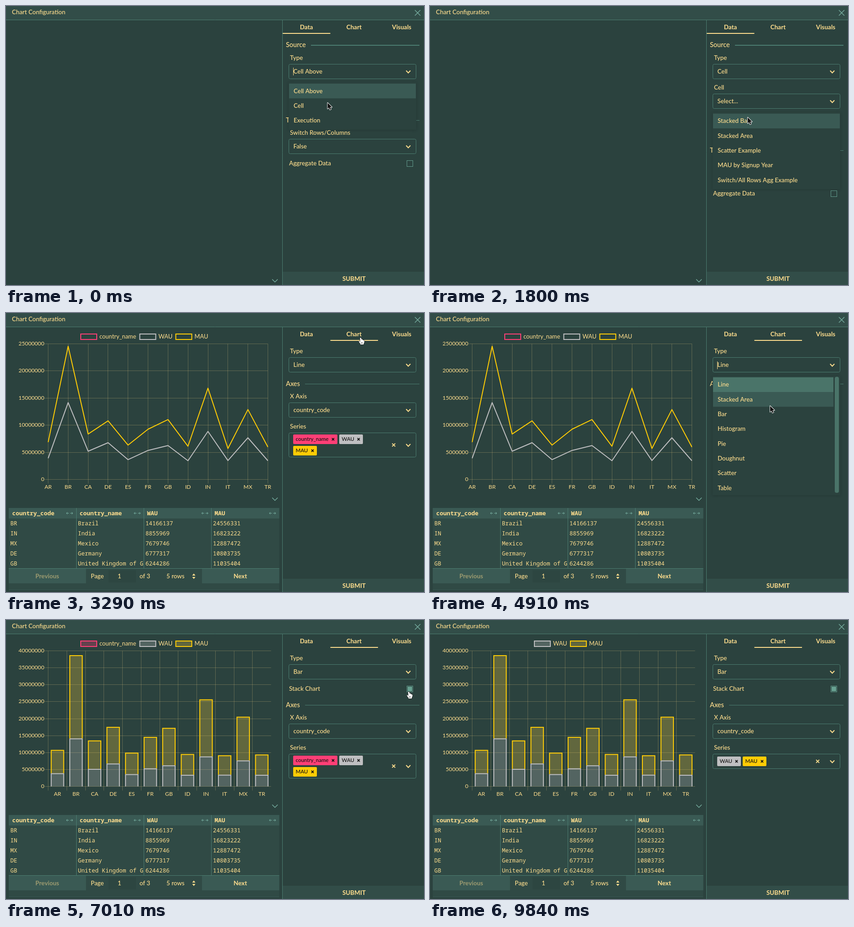
Recreate the animation shown at these times as an HTML page with a canvas. Size 917 px wide and 611 px high, loop 9.94 s.

```html
<!DOCTYPE html>
<html lang="en">
<head>
<meta charset="utf-8">
<title>Chart Configuration</title>
<style>
html, body { margin: 0; width: 100%; height: 100%; overflow: hidden; background: #2b423e; }
canvas { display: block; }
</style>
</head>
<body>
<canvas id="stage" width="917" height="611"></canvas>
<script>
const g = document.getElementById('stage').getContext('2d');
const LOOP = 9940;
const C = {
  bg: '#2b423e', bar: '#324d48', hover: '#3a5a54', selected: '#4a7469', line: '#4c7d71',
  icon: '#76ad9f', text: '#ffde8e', panel: '#304a45', grid: 'rgba(255,218,135,.26)'
};
const SANS = 'Lato, "Open Sans", sans-serif';
const MONO = '"Noto Sans Mono", "DejaVu Sans Mono", monospace';
const UI = '500 13.4px ' + SANS, BOLD = 'bold 13.5px ' + SANS, HEAD = '500 14.5px ' + SANS;
const LEGEND = '12.9px ' + SANS, TICK = '12.2px ' + SANS, TAG = '500 11.5px ' + SANS;

const SERIES = [
  { name: 'country_name', rgb: '255,63,118', fill: 'rgba(255,63,118,.27)', width: 97 },
  { name: 'WAU', rgb: '191,191,193', fill: 'rgba(191,191,193,.27)', width: 52 },
  { name: 'MAU', rgb: '255,204,5', fill: 'rgba(250,208,62,.26)', width: 52 }
];
const CODES = 'AR BR CA DE ES FR GB ID IN IT MX TR'.split(' ');
const WAU = [3.9, 14.166, 5.2, 6.777, 3.65, 5.35, 6.244, 3.45, 8.856, 3.48, 7.68, 3.45];
const MAU = [6.87, 24.556, 8.37, 10.804, 6.33, 9.26, 11.035, 6.12, 16.823, 5.7, 12.887, 5.97];
const ROWS = [
  ['BR', 'Brazil', '14166137', '24556331'],
  ['IN', 'India', '8855969', '16823222'],
  ['MX', 'Mexico', '7679746', '12887472'],
  ['DE', 'Germany', '6777317', '10803735'],
  ['GB', 'United Kingdom of G', '6244286', '11035404']
];
const TYPES = ['Cell Above', 'Cell', 'Execution'];
const CELLS = ['Stacked Bar', 'Stacked Area', 'Scatter Example', 'MAU by Signup Year', 'Switch/All Rows Agg Example'];
const CHARTS = ['Line', 'Stacked Area', 'Bar', 'Histogram', 'Pie', 'Doughnut', 'Scatter', 'Table'];

function rect(x, y, w, h, color) {
  g.fillStyle = color;
  g.fillRect(x, y, w, h);
}
function path(points, color, width = 1) {
  g.beginPath();
  for (let i = 0; i < points.length; i += 2) g.lineTo(points[i], points[i + 1]);
  g.strokeStyle = color;
  g.lineWidth = width;
  g.stroke();
}
function box(x, y, w, h, color, r = 3) {
  g.beginPath();
  g.roundRect(x, y, w, h, r);
  g.strokeStyle = color;
  g.lineWidth = 1;
  g.stroke();
}
// y is the vertical centre of the capitals
function text(s, x, y, font = UI, color = C.text, align = 'left') {
  g.font = font;
  g.fillStyle = color;
  g.textAlign = align;
  g.fillText(s, x, y + 4.7);
}
const chevron = (x, y, w, h, color, width) => path([x - w, y - h, x, y + h, x + w, y - h], color, width);
function cross(x, y, r, color, width) {
  path([x - r, y - r, x + r, y + r], color, width);
  path([x - r, y + r, x + r, y - r], color, width);
}

function section(title, y, lineX, width = 1) {
  text(title, 614, y, HEAD);
  path([lineX, y + .5, 907, y + .5], C.line, width);
}
function control(y, h = 32) {
  box(620.5, y + .5, 279, h, C.line);
  chevron(882.5, y + h / 2 + 1, 4.7, 2.5, C.text, 2);
}
function select(label, value, y) {
  text(label, 623, y - 13.5);
  control(y);
  text(value, 630.5, y + 16);
}
const caret = y => rect(630, y, 1, 17, C.text);
function checkbox(label, y, checked) {
  text(label, 621, y);
  if (checked) rect(881, y - 4, 10, 10, '#68a292');
  g.strokeStyle = '#619a8b';
  g.lineWidth = 1;
  g.strokeRect(879.5, y - 5.5, 13, 13);
}
function menu(items, top, focus, chosen, scroll) {
  const row = 32.3, h = items.length * row + (scroll ? 0 : 4), w = scroll ? 264 : 278;
  g.save();
  g.shadowColor = 'rgba(0,0,0,.16)';
  g.shadowBlur = 6;
  g.shadowOffsetY = 1;
  rect(620, top - 3, 280, h + 3, C.bg);
  g.restore();
  items.forEach((item, i) => {
    const y = top + i * row;
    if (i === focus) rect(621, y, w, row, C.hover);
    else if (i === chosen) rect(621, y, w, row, C.selected);
    text(item, 631, y + 16);
  });
  if (scroll) {
    g.fillStyle = C.selected;
    g.beginPath();
    g.roundRect(888, top - 1, 9, 254, 4);
    g.fill();
  }
}
const rowAt = (y, top) => Math.max(0, Math.floor((y - top) / 32.3));

function frame(tab, tableOpen) {
  rect(0, 0, 917, 611, C.bg);
  rect(0, 0, 917, 30, C.bar);
  path([0, 30.5, 917, 30.5], C.line);
  path([606.5, 30, 606.5, 611], C.line);
  text('Chart Configuration', 13, 13.5);
  cross(903, 15, 6, C.icon, 1.4);
  ['Data', 'Chart', 'Visuals'].forEach((s, i) => text(s, 659 + i * 104.5, 46.5, BOLD, C.text, 'center'));
  rect(607 + tab * 104.6, 59, 104.5, 2, C.text);
  rect(607, 582, 310, 29, C.bar);
  text('SUBMIT', 763.5, 597, BOLD, C.text, 'center');
  chevron(590, tableOpen ? 407.5 : 601.5, 6, 3, C.icon, 1.5);
}

function dataTab(t, mouse) {
  const open = t < 600, shift = open ? 0 : 65.5;
  section('Source', 85.5, 669, 2);
  select('Type', open ? 'Cell Above' : 'Cell', 127);
  if (!open) select('Cell', t < 2250 ? 'Select...' : 'Stacked Bar', 192);
  section('Transform', Math.round(250 + shift), 691);
  select('Switch Rows/Columns', 'False', Math.round(290.5 + shift));
  checkbox('Aggregate Data', Math.round(344 + shift), false);
  if (open) {
    menu(TYPES, 170, t < 150 ? 0 : 1, 0);
    if (t < 150) caret(135);
  } else if (t >= 1350 && t < 2250) {
    menu(CELLS, 235.7, rowAt(mouse.y, 235.7));
  }
}

function tags(list, y) {
  let x = 630;
  for (const s of list) {
    if (x + s.width > 800) { x = 630; y += 25; }
    g.fillStyle = `rgb(${s.rgb})`;
    g.beginPath();
    g.roundRect(x, y, s.width, 21, 2);
    g.fill();
    text(s.name, x + 5.5, y + 9.7, TAG, '#111');
    cross(x + s.width - 9.5, y + 10.5, 2.6, '#111', 1.7);
    x += s.width + 4;
  }
}
function chartTab(t, mouse, list) {
  const bar = t >= 5510, dy = bar ? 31.5 : 0;
  const all = list.length === 3;
  select('Type', bar ? 'Bar' : 'Line', 97);
  if (bar) checkbox('Stack Chart', 150, t >= 7010);
  section('Axes', Math.floor(155 + dy), 656);
  select('X Axis', 'country_code', Math.floor(196 + dy));
  text('Series', 623, 248 + dy);
  const top = Math.floor(262 + dy), h = all ? 53 : 32;
  control(top, h);
  cross(850.5, top + h / 2 + .5, 3.4, C.text, 2);
  tags(list, top + (all ? 4 : 6));
  if (!all && Math.floor((t - 8500) / 445) % 2 === 0) rect(742, 301, 1, 17, C.text);
  if (t >= 4020 && !bar) {
    menu(CHARTS, 140.7, rowAt(mouse.y, 140.7), 0, true);
    if (Math.floor((t - 4320) / 445) & 1) caret(106);
  }
}

function legend(list, filled) {
  let x = list.length === 3 ? 164 : 229;
  for (const s of list) {
    if (filled) rect(x, 46, 35, 12, s.fill);
    g.strokeStyle = `rgb(${s.rgb})`;
    g.lineWidth = 2;
    g.strokeRect(x, 46, 35, 12);
    text(s.name, x + 41, 51.5, LEGEND);
    x += s.name === 'WAU' ? 79 : 129.5;
  }
}
function barShape(x, y, w, h, s) {
  rect(x, y, w, h, s.fill);
  path([x + 1, y + h, x + 1, y + 1, x + w - 1, y + 1, x + w - 1, y + h], `rgb(${s.rgb})`, 2);
}
function chart(t, list) {
  const bars = t >= 5510, stacked = t >= 7010;
  const max = stacked ? 40 : 25, left = 92.5, top = 67.5, base = 364.5;
  const right = bars ? 581.5 : 574.5;
  const step = (right - left) / (bars ? 12 : 11);
  const scale = (base - top) / max;
  legend(list, bars);
  for (let v = 0; v <= max; v += 5) {
    const y = Math.round(base - v * scale - .5) + .5;
    path([85, y, right, y], C.grid);
    text(v ? v + '000000' : '0', 84, y - 1, TICK, C.text, 'right');
  }
  CODES.forEach((s, i) => {
    const x = left + i * step, line = Math.round(x - .5) + .5;
    path([line, top, line, 373.5], C.grid);
    text(s, x + (bars ? step / 2 : 0), 380, TICK, C.text, 'center');
  });
  if (!bars) {
    g.lineJoin = 'round';
    [WAU, MAU].forEach((data, k) =>
      path(data.flatMap((v, i) => [left + i * step, base - v * scale]), `rgb(${SERIES[k + 1].rgb})`, 2));
    g.lineJoin = 'miter';
    return;
  }
  const slot = stacked ? step * .8 : step * .8 / 3, w = slot * .9;
  CODES.forEach((_, i) => {
    const x = left + (i + .5) * step - w / 2;
    const a = WAU[i] * scale, b = MAU[i] * scale;
    barShape(x, base - a, w, a, SERIES[1]);
    if (stacked) barShape(x, base - a - b, w, b, SERIES[2]);
    else barShape(x + slot, base - b, w, b, SERIES[2]);
  });
}

function resizeIcon(x, y) {
  for (const d of [-1, 1]) {
    path([x + d * 1.5, y, x + d * 7, y], C.icon);
    path([x + d * 4.5, y - 2.5, x + d * 7, y, x + d * 4.5, y + 2.5], C.icon);
  }
}
function table() {
  rect(6, 427, 593.5, 179, C.panel);
  rect(6, 427, 593.5, 23, C.hover);
  ['country_code', 'country_name', 'WAU', 'MAU'].forEach((s, i) => {
    text(s, 13.5 + i * 148, 438, 'bold 12.9px ' + MONO);
    resizeIcon(139.5 + i * 148.4, 438.5);
    if (i) path([6.5 + i * 148, 427, 6.5 + i * 148, 559], C.line);
  });
  ROWS.forEach((row, r) => row.forEach((s, i) =>
    text(s, 9.5 + i * 148.2, 460.7 + r * 21.8, '12.6px ' + MONO)));
  path([6, 559.5, 599.5, 559.5], C.line);
  rect(6, 560, 169.5, 32, C.hover);
  rect(430, 560, 169.5, 32, C.hover);
  rect(225, 563, 60, 27, '#2d4641');
  path([6, 606.5, 599.5, 606.5], C.hover);
  text('Previous', 90.5, 576, BOLD, 'rgba(255,222,142,.5)', 'center');
  text('Page', 186, 576);
  text('1', 249, 576, UI, C.text, 'center');
  text('of 3', 293, 576);
  text('5 rows', 352, 576);
  for (const d of [-1, 1]) {
    g.beginPath();
    g.moveTo(408.5, 576.5 + d * 1.5);
    g.lineTo(415.5, 576.5 + d * 1.5);
    g.lineTo(412, 576.5 + d * 6);
    g.fillStyle = C.text;
    g.fill();
  }
  text('Next', 514, 576, BOLD, C.text, 'center');
}

// start, end, target x, target y; the pointer is sampled about every 148 ms
const MOVES = [
  [1350, 1800, 697, 244], [2250, 2840, 778, 54], [3440, 3730, 755, 110],
  [4020, 4470, 751, 160], [4770, 5210, 744.5, 218], [5660, 6260, 883.5, 157],
  [7460, 7900, 717, 304], [8800, 9100, 800, 587]
];
const HOT = [[607, 31, 917, 61], [878, 143, 894, 159], [709, 297, 727, 318], [607, 582, 917, 611]];

function pointer(t) {
  let x = 705.5, y = 212;
  for (const [from, to, tx, ty] of MOVES) {
    if (t < from) break;
    const n = Math.round((to - from) / 148) + 1;
    const k = Math.floor((t - from) / (to - from) * (n - 1) + .06) + 1;
    const p = 1 - (1 - Math.min(1, k / n)) ** 2;
    x += (tx - x) * p;
    y += (ty - y) * p;
  }
  return { x, y };
}
const ARROW = new Path2D('M0 0V13.2L3 10.4L5.2 15.3L7.6 14.2L5.4 9.5H9.6Z');
const HAND = new Path2D('M-1.4 1Q0-.8 1.3 1L1.7 5Q3-.0 4.4 5.6Q5.6 4 6.6 6.4Q8 5.4 8.3 7.6Q8.4 11 6.6 13.2V15H-.6V13.6Q-2.6 11.4-4 8.6Q-4.4 7-2.6 7.4L-.8 9Z');
function drawPointer({ x, y }) {
  const hand = HOT.some(([a, b, c, d]) => x >= a && x <= c && y >= b && y <= d);
  const shape = hand ? HAND : ARROW;
  g.save();
  g.translate(x, y);
  g.lineJoin = 'round';
  g.lineWidth = hand ? 1.1 : 1.8;
  g.strokeStyle = hand ? '#111' : '#fff';
  g.fillStyle = hand ? '#fff' : '#111';
  g.stroke(shape);
  g.fill(shape);
  if (hand) {
    path([1.2, 10, 1.2, 13], '#111', .8);
    path([3.6, 10, 3.6, 13], '#111', .8);
  }
  g.restore();
}

function draw(t) {
  const mouse = pointer(t), loaded = t >= 2250, tab = t >= 3290 ? 1 : 0;
  const list = t < 8500 ? SERIES : SERIES.slice(1);
  frame(tab, loaded);
  if (loaded) {
    chart(t, list);
    table();
  }
  if (tab) chartTab(t, mouse, list);
  else dataTab(t, mouse);
  if (t < 9390) drawPointer(mouse);
}

const start = performance.now();
function tick() {
  draw((performance.now() - start) % LOOP);
  requestAnimationFrame(tick);
}
tick();
</script>
</body>
</html>
```
